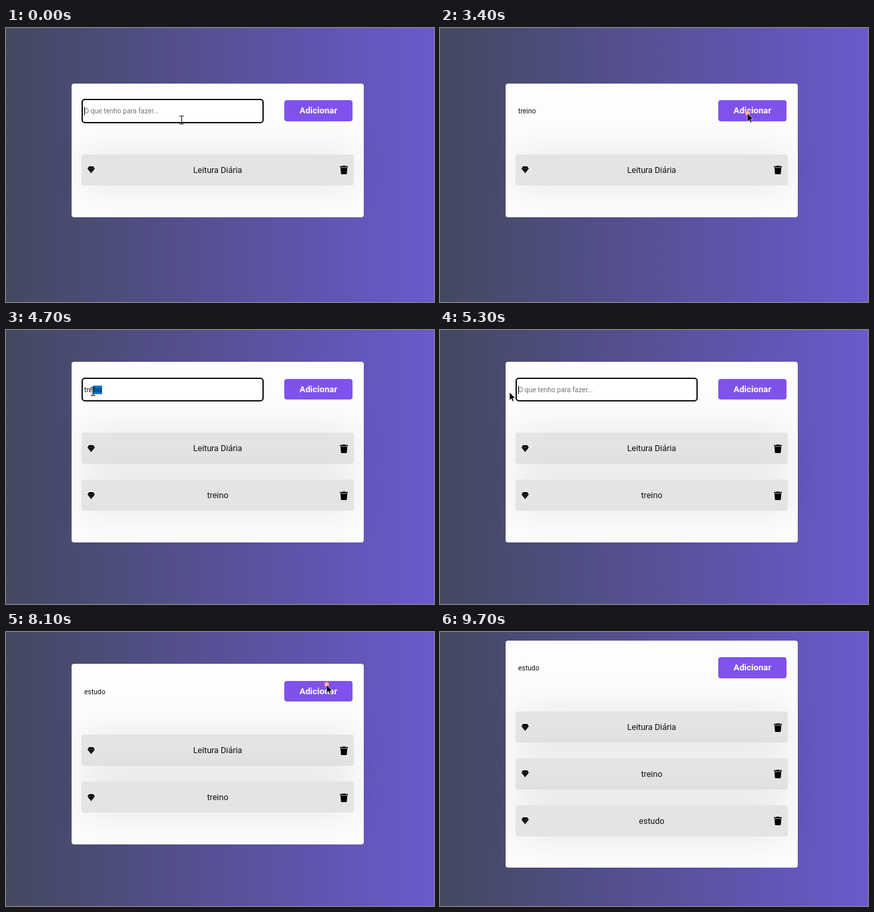
These frames come from a looping animation (646 px wide and 414 px high, 9.8 s). An HTML page:

```html
<!DOCTYPE html>
<html lang="pt">
<head>
<meta charset="utf-8">
<style>
  html, body { margin: 0; width: 100%; height: 100%; overflow: hidden; }
  body {
    position: relative;
    background: linear-gradient(to right, #434860, #6a5acd);
    font: 12.6px Roboto, sans-serif;
    color: #111;
  }
  body *, svg { position: absolute; box-sizing: border-box; }
  #card { left: 99px; width: 441px; border-radius: 4px; background: #fdfdfd; }
  #input {
    left: 15px; top: 23.5px; width: 275px; height: 36.5px;
    padding-left: 2px; border: 2px solid transparent; border-radius: 5px;
    font-size: 10.45px; line-height: 33.5px; white-space: pre;
  }
  #input.focused { border-color: #111; background: #fff; }
  #input * { position: static; }
  #caret {
    display: inline-block; width: 1px; height: 13px; margin-right: -1px;
    vertical-align: -3px; background: #111;
  }
  #hint { color: #757575; }
  #button {
    left: 321px; top: 25.5px; width: 103px; height: 31.5px; border-radius: 4px;
    background: #7f52ec; color: #fff;
    font-size: 13.2px; font-weight: 700; line-height: 32px; text-align: center;
  }
  .item {
    left: 15px; width: 411px; height: 47px; border-radius: 4px;
    background: #e4e4e4; box-shadow: 0 0 60px rgba(0, 0, 0, .1);
    line-height: 48px; text-align: center;
  }
  .gem { left: 9px; top: 18.5px; }
  .trash { left: 390px; top: 17.5px; }
  #ring {
    border-radius: 50%; transform: translate(-50%, -50%);
    background: radial-gradient(closest-side, rgba(255, 222, 212, .9), rgba(250, 165, 165, .9) 60%, rgba(240, 105, 110, .9));
  }
  #arrow, #beam { left: 0; top: 0; overflow: visible; }
</style>
</head>
<body>
<div id="card">
  <div id="input"><span id="value"></span><i id="caret"></i><span id="hint">O que tenho para fazer...</span></div>
  <div id="button">Adicionar</div>
</div>
<div id="ring"></div>
<svg id="arrow" width="10" height="16"><path d="M0 0V12.2L2.8 9.7 4.7 14 6.7 13.1 4.8 8.9H8.6Z" stroke="#fff" stroke-width=".6"/></svg>
<svg id="beam" width="8" height="14"><path d="M-3.5-6H-1Q0-6 0-5Q0-6 1-6H3.5M0-5V5M-3.5 6H-1Q0 6 0 5Q0 6 1 6H3.5" fill="none" stroke="#222" stroke-width="1.2"/></svg>
<script>
const LOOP = 9800, STEP = 100, ROW = 70.8;
const $ = id => document.getElementById(id);
const card = $("card"), input = $("input"), value = $("value"), caret = $("caret");
const hint = $("hint"), ring = $("ring"), arrow = $("arrow"), beam = $("beam");

const icons = `
  <svg class="gem" width="11" height="11"><path d="M2.3 0H8.7L11 3.5 5.5 10.4 0 3.5Z"/>
    <path d="M.8 3.5H10.2M3.4 3.5 5.5 9M7.6 3.5 5.5 9" fill="none" stroke="#777" stroke-width=".4"/></svg>
  <svg class="trash" width="12" height="13"><path d="M0 .8H3.6L4.1 0H7.9L8.4.8H12V2.5H0ZM.8 3.3H11.2L10.4 11.9Q10.3 13 9.2 13H2.8Q1.7 13 1.6 11.9Z"/></svg>`;

const items = ["Leitura Diária", "treino", "estudo"].map((name, i) => {
  const item = document.createElement("div");
  item.className = "item";
  item.style.top = 107.3 + i * ROW + "px";
  item.innerHTML = name + icons;
  card.append(item);
  return item;
});

const typing = (word, times) => times.map((t, i) => [t, word.slice(0, i + 1)]);
const edits = [
  [-200, ""],
  ...typing("treino", [1000, 1200, 1400, 1500, 1700, 1900]),
  [4300, "treino"],
  [5300, ""],
  ...typing("estudo", [5900, 6100, 6300, 6500, 6700, 6800]),
];
const releases = [3400, 5000, 8100];

// Pointer stops: time, x, y
const path = [
  [0, 265, 139], [2600, 265, 139], [3100, 464, 129], [3500, 464, 129],
  [3900, 171, 123], [4250, 150, 92], [4500, 150, 92], [4950, 105, 94],
  [5800, 105, 94], [6100, 118, 95], [7300, 118, 95], [8000, 484, 80],
  [8600, 484, 80], [9600, 500, -20], [LOOP, 500, -20],
];

function pointerAt(t) {
  const i = path.findIndex(p => p[0] > t);
  const [t0, x0, y0] = path[i - 1], [t1, x1, y1] = path[i];
  const p = (t - t0) / (t1 - t0), e = p * p * (3 - 2 * p);
  return [x0 + (x1 - x0) * e, y0 + (y1 - y0) * e];
}

const show = (el, on) => { el.style.display = on ? "" : "none"; };

function draw(t) {
  const count = 1 + (t >= 3500) + (t >= 8200);
  const top = 83.6 - (count - 1) * ROW / 2;
  card.style.top = top + "px";
  card.style.height = 202 + (count - 1) * ROW + "px";
  items.forEach((item, i) => show(item, i < count));

  const [x, y] = pointerAt(t);
  const focused = t < 3300 || (t >= 4300 && t < 8000);
  const [edited, text] = edits.findLast(e => e[0] <= t);
  const selecting = t >= 4600 && t < 5300;
  input.classList.toggle("focused", focused);
  value.textContent = text;
  value.style.background = selecting ? `linear-gradient(90deg, transparent ${Math.max(0, x - 118)}px, #0078d7 0)` : "";
  value.style.color = selecting && x < 130 ? "#fff" : "";
  show(hint, !text);
  const lit = focused && !selecting && Math.floor((t - edited) / 600) % 2 === 0;
  caret.style.visibility = lit ? "visible" : "hidden";

  const inField = x > 114 && x < 389 && y > top + 23 && y < top + 60;
  const dragging = t >= 4500 && t < 5000;
  show(beam, inField || dragging);
  show(arrow, !inField && !dragging);
  beam.style.transform = arrow.style.transform = `translate(${x}px, ${y}px)`;

  const age = t - releases.findLast(r => r <= t);
  show(ring, age < 300);
  if (age < 300) {
    ring.style.left = x + "px";
    ring.style.top = y - 1 + "px";
    ring.style.width = ring.style.height = 8 + age * 0.15 + "px";
    ring.style.opacity = 1 - age / 400;
  }
}

const start = performance.now();
function tick() {
  const t = (performance.now() - start) % LOOP;
  draw(Math.floor(t / STEP) * STEP);
  requestAnimationFrame(tick);
}
tick();
</script>
</body>
</html>
```
